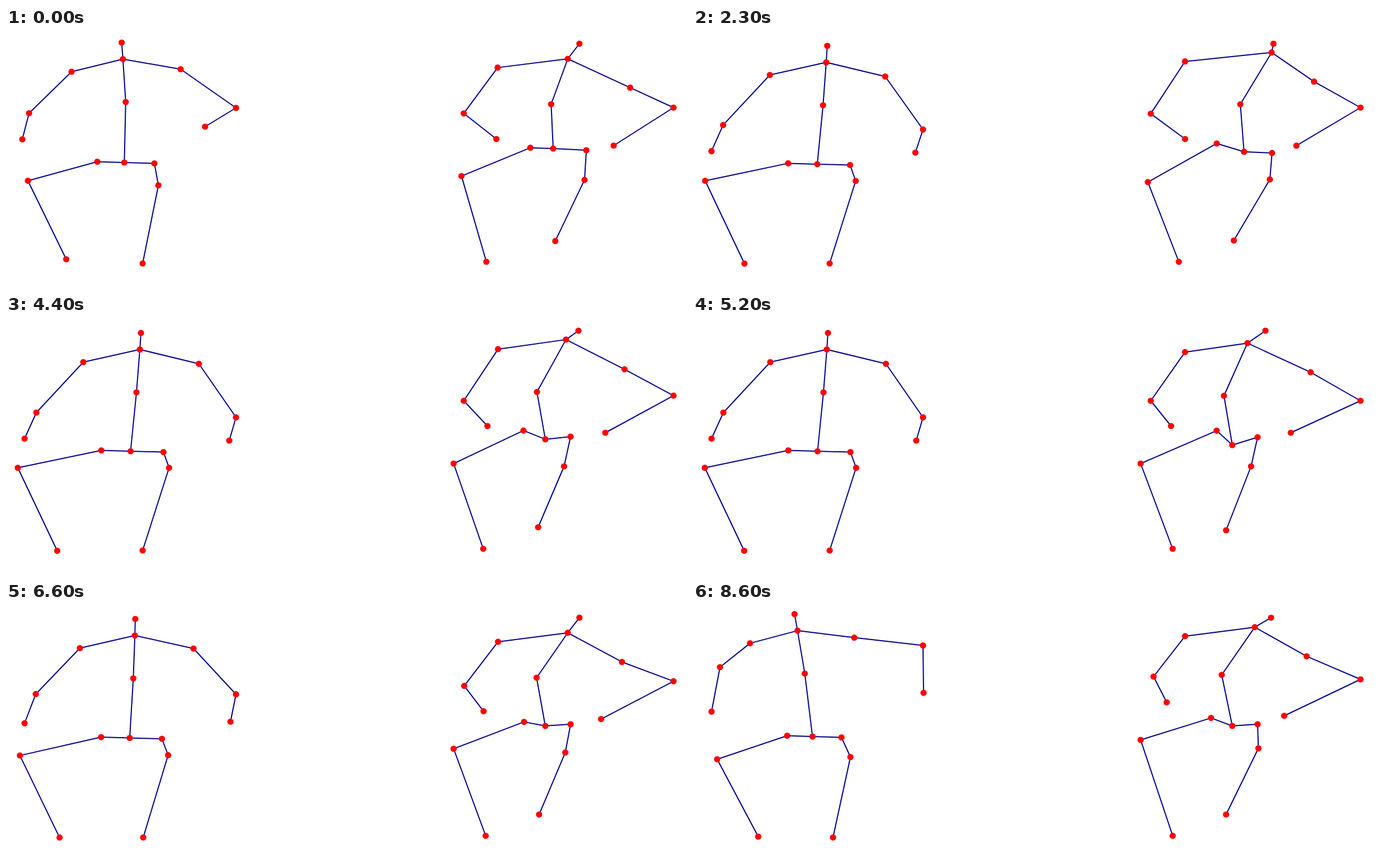
An HTML page that plays this animation: 1211x462 px, repeating every 8.7 s.

```html
<!DOCTYPE html>
<html lang="en">
<head>
<meta charset="utf-8">
<title>Two moving skeletons</title>
<style>
  html, body { margin: 0; width: 100%; height: 100%; overflow: hidden; background: #fff; }
  svg { display: block; width: 100%; height: 100%; }
  path { fill: none; stroke-linecap: round; stroke-linejoin: round; }
  #bones { stroke: #00008b; stroke-width: 2; }
  #joints { stroke: #f00; stroke-width: 11.2; }
</style>
</head>
<body>
<svg viewBox="0 0 1211 462">
  <path id="bones"/>
  <path id="joints"/>
</svg>
<script>
const LOOP = 8700, STEP = 100;
const CHAINS = [
  "head neck spine pelvis",
  "neck shoulderL elbowL handL", "neck shoulderR elbowR handR",
  "pelvis hipL kneeL footL", "pelvis hipR kneeR footR"
].map(chain => chain.split(" "));

const leftRest = {
  head: [240, 32], neck: [238, 61.5], spine: [232, 138], pelvis: [221.5, 243],
  shoulderL: [137.5, 84], elbowL: [54, 174], handL: [33, 220.5],
  shoulderR: [343, 87], elbowR: [409, 182.5], handR: [397, 224],
  hipL: [169.5, 241.5], kneeL: [21, 272.5], footL: [91, 420.5],
  hipR: [280, 244.5], kneeR: [290, 272.5], footR: [243, 420]
};
const rightRest = {
  head: [1018, 28], neck: [999, 48], spine: [955, 136], pelvis: [965, 221],
  shoulderL: [875, 64], elbowL: [814, 153], handL: [857, 198],
  shoulderR: [1100, 100], elbowR: [1187, 142], handR: [1066, 210],
  hipL: [926, 209], kneeL: [802, 265], footL: [853, 417],
  hipR: [1016, 218], kneeR: [1008, 270], footR: [960, 379]
};

const span = (from, to, t) => Math.min(1, Math.max(0, (t - from) / (to - from)));
const smooth = (from, to, t) => {
  const k = span(from, to, t);
  return k * k * (3 - 2 * k);
};
const bump = (centre, t) => Math.exp(-(((t - centre) / 600) ** 2));

// The opening pose settles; near the end the arms rise.
const settle = t => 1 - smooth(0, 2600, t);
const raise = t => span(5200, 8600, t) ** 2;

// Copies a rest pose and returns it with a function that offsets one joint.
function rig(rest) {
  const pose = {};
  for (const name in rest) pose[name] = [...rest[name]];
  const move = (name, dx, dy = 0) => {
    pose[name][0] += dx;
    pose[name][1] += dy;
  };
  return { pose, move };
}

function leftFigure(t) {
  const { pose, move } = rig(leftRest);
  const s = settle(t), r = raise(t), sway = bump(1000, t);
  const lean = 30 * s + 52 * r;
  for (const name of ["head", "neck", "spine", "shoulderL", "shoulderR"])
    move(name, -lean * (272 - leftRest[name][1]) / 210, -0.2 * lean);
  move("shoulderL", 0.2 * lean);
  move("shoulderR", -0.2 * lean, -0.25 * lean);

  const lift = 40 * s + 105 * r;
  move("elbowR", 0, -lift);
  move("elbowL", -13 * s - 6 * r, -0.55 * lift);
  move("handR", 13 * r - 43 * s, -48 * s - 62 * r);
  move("handL", -4 * s, -22 * s - 25 * r);

  for (const name of ["pelvis", "hipL", "hipR"])
    move(name, -10 * s - 9 * r - 18 * sway, -3 * (s + r));
  move("hipL", 4 * s + 7 * r);
  move("hipR", -5 * s - 7 * r);
  move("kneeL", 18 * s + 22 * r, 8 * r);
  move("footL", 17 * s + 25 * r - 15 * sway, -8 * s - 2 * r);
  move("kneeR", -19 * s - 10 * r, 8 * s + 4 * r);
  move("footR", 6 * r);
  return pose;
}

function rightFigure(t) {
  const { pose, move } = rig(rightRest);
  const r = raise(t);
  const sway = 16 - 28 * smooth(2000, 3700, t);
  const drift = 15 - 30 * t / LOOP;
  const bob = 7 * Math.cos(2 * Math.PI * t / 6500);
  const nod = bump(1000, t), bend = bump(2300, t);
  const kick = bump(3600, t), dip = bump(5200, t);

  move("head", 27 * nod + 14 * bend + 10 * r);
  move("neck", 30 * bend - 6 * kick - 13 * dip, bob - 6 * kick);
  move("spine", 0.9 * sway + 6 * bend - 4 * r, 8 * dip - 6 * r);
  move("pelvis", 0.5 * sway + 8 * bend, 11 * dip - 7 * kick - 6 * settle(t));

  move("shoulderL", -12 * nod, bob - 6 * nod);
  move("elbowL", 5 * r, -11 * nod - 20 * r);
  move("handL", drift + 11 * bend - 4 * dip, -19 * r);
  move("shoulderR", 0.6 * drift + 14 * nod, bob - 9 * nod);
  move("elbowR", 0, 11 * dip - 4 * r);
  move("handR", drift - 7 * nod, -4 * nod - 7 * r);

  move("hipL", 0.4 * sway - 16 * kick + 10 * dip, 0.7 * (bob - 6 * nod - 6 * dip));
  move("kneeL", 0.5 * sway, -14 * nod + 10 * bend - 19 * r);
  move("footL", 19 * nod + 11 * bend - 26 * kick);
  move("hipR", sway, 5 * bend - 6 * kick);
  move("kneeR", 1.3 * sway + 13 * r, 14 * nod - 9 * r);
  move("footR", sway + 13 * nod - 12 * bend - 10 * kick, 15 * nod - 8 * kick + 5 * dip);
  return pose;
}

const bones = document.getElementById("bones");
const joints = document.getElementById("joints");
const start = performance.now();

function draw() {
  const elapsed = Math.max(0, performance.now() - start) % LOOP;
  const time = Math.floor(elapsed / STEP) * STEP;
  let lines = "", dots = "";
  for (const pose of [leftFigure(time), rightFigure(time)]) {
    const at = name => pose[name].map(v => v.toFixed(2)).join(" ");
    for (const chain of CHAINS) lines += "M" + chain.map(at).join("L");
    for (const name in pose) dots += `M${at(name)}h0`;
  }
  bones.setAttribute("d", lines);
  joints.setAttribute("d", dots);
  requestAnimationFrame(draw);
}
draw();
</script>
</body>
</html>
```
